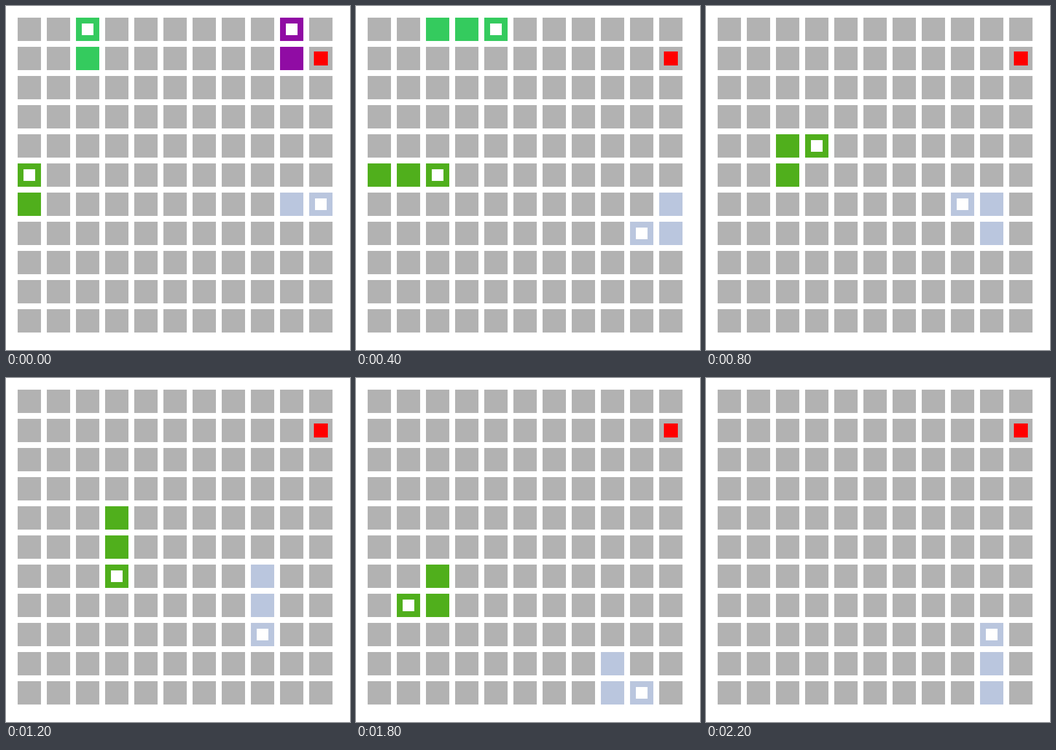
Recreate the animation shown at these times as an HTML page with a canvas. Size 590 by 590 pixels, loop 2.4 s.

```html
<!DOCTYPE html>
<html lang="en">
<head>
<meta charset="utf-8">
<title>Snakes</title>
<style>
html, body { margin: 0; width: 100%; height: 100%; overflow: hidden; background: #fff; }
canvas { display: block; }
</style>
</head>
<body>
<canvas id="stage" width="590" height="590"></canvas>
<script>
const ctx = document.getElementById('stage').getContext('2d');
const SIZE = 11, STEP = 200, STEPS = 12, LENGTH = 3;
const DIRS = { U: [0, -1], D: [0, 1], L: [-1, 0], R: [1, 0] };
const food = [10, 1];

// Each snake starts with tail and head; it dies after its last move.
const snakes = [
  { color: '#34cb5e', tail: [2, 1], moves: 'URR' },
  { color: '#900ca4', tail: [9, 1], moves: 'U' },
  { color: '#50af1c', tail: [0, 6], moves: 'URRURDDLDLU' },
  { color: '#bac6de', tail: [9, 6], moves: 'RDLULDDDDRUU' }
];

for (const s of snakes) {
  s.path = [s.tail];
  for (const m of s.moves) {
    const [x, y] = s.path[s.path.length - 1];
    s.path.push([x + DIRS[m][0], y + DIRS[m][1]]);
  }
}

function square([col, row], size, color) {
  const inset = (40 - size) / 2;
  ctx.fillStyle = color;
  ctx.fillRect(20 + col * 50 + inset, 20 + row * 50 + inset, size, size);
}

function draw(step) {
  ctx.fillStyle = '#fff';
  ctx.fillRect(0, 0, 590, 590);
  for (let row = 0; row < SIZE; row++) {
    for (let col = 0; col < SIZE; col++) square([col, row], 40, '#b2b2b2');
  }
  square(food, 24, '#f00');
  for (const { path, color } of snakes) {
    const head = step + 1;
    if (head >= path.length) continue;
    const body = path.slice(Math.max(0, head - LENGTH + 1), head + 1);
    for (const cell of body) square(cell, 40, color);
    square(path[head], 20, '#fff');
  }
}

const start = performance.now();
let shown = -1;

function tick() {
  const step = Math.floor((performance.now() - start) / STEP) % STEPS;
  if (step !== shown) draw(shown = step);
  requestAnimationFrame(tick);
}
tick();
</script>
</body>
</html>
```
